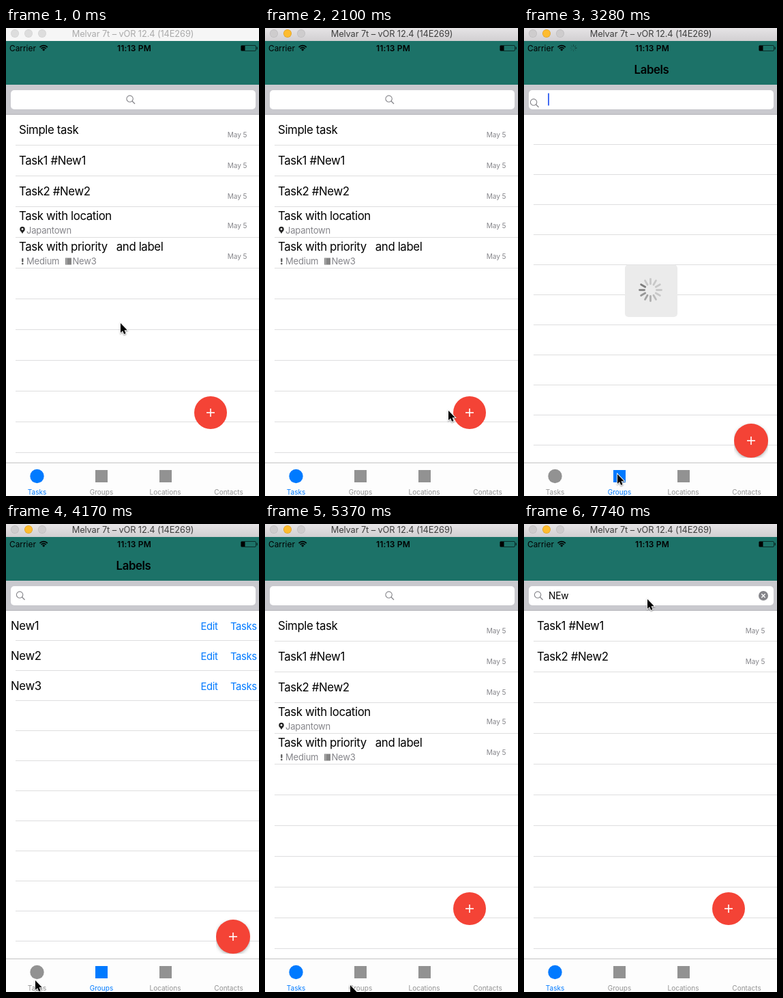
Write an HTML page with a canvas that moves like this. It is 371 px wide and 685 px high and loops after 8000 ms.

```html
<!DOCTYPE html>
<html lang="en">
<head>
<meta charset="utf-8">
<title>Task list</title>
<style>
  html, body { margin: 0; width: 100%; height: 100%; overflow: hidden; background: #fff; }
  canvas { display: block; }
</style>
</head>
<body>
<canvas id="stage" width="371" height="685"></canvas>
<script>
const ctx = document.getElementById('stage').getContext('2d');
const W = 371, H = 685, LOOP = 8000;
const BLUE = '#007aff', GRAY = '#929292', RED = '#f44336', TEAL = '#1c7268';

// Pointer stops: time, x, y
const POINTER = [
  [0, 168, 432], [1950, 243, 521], [2100, 269, 560], [2250, 191, 618],
  [2400, 161, 652], [2540, 159, 652], [2690, 137, 653], [3570, 110, 655],
  [3720, 51, 669], [4170, 43, 668], [5370, 125, 675], [5660, 164, 193],
  [5810, 165, 178], [5950, 181, 110]
];
// Caret stops: time, x, opacity
const CARET = [
  [0, 36, 0], [3280, 36, 1], [4020, 36, .5], [4170, 36, 0], [6550, 36, 1],
  [6850, 54, 1], [7000, 65, 1], [7590, 65, .5], [7740, 65, 0]
];
const TASKS = [
  { title: 'Simple task' },
  { title: 'Task1 #New1' },
  { title: 'Task2 #New2' },
  { title: 'Task with location', place: 'Japantown' },
  { title: 'Task with priority\u00a0\u00a0\u00a0and label', priority: 'Medium', label: 'New3' }
];
const LABELS = ['New1', 'New2', 'New3'];
const TABS = [['Tasks', 45.5], ['Groups', 140], ['Locations', 233.5], ['Contacts', 326.5]];

const latest = (stops, t) => stops.filter(s => s[0] <= t).pop();

function text(str, x, y, size, { color = '#000', align = 'left', spacing = 0, weight = 400 } = {}) {
  ctx.font = `${weight} ${size}px Inter, sans-serif`;
  ctx.letterSpacing = spacing + 'px';
  ctx.textAlign = align;
  ctx.fillStyle = color;
  ctx.fillText(str, x, y);
}

function rect(x, y, w, h, color, radius = 0) {
  ctx.fillStyle = color;
  ctx.beginPath();
  ctx.roundRect(x, y, w, h, radius);
  ctx.fill();
}

function disc(x, y, r, color) {
  ctx.fillStyle = color;
  ctx.beginPath();
  ctx.arc(x, y, r, 0, Math.PI * 2);
  ctx.fill();
}

function line(x1, y1, x2, y2, color, width, cap = 'butt') {
  ctx.strokeStyle = color;
  ctx.lineWidth = width;
  ctx.lineCap = cap;
  ctx.beginPath();
  ctx.moveTo(x1, y1);
  ctx.lineTo(x2, y2);
  ctx.stroke();
}

function shape(points, color) {
  ctx.fillStyle = color;
  ctx.beginPath();
  points.forEach(([x, y]) => ctx.lineTo(x, y));
  ctx.closePath();
  ctx.fill();
}

function titleBar(active) {
  const fill = ctx.createLinearGradient(0, 0, 0, 19);
  fill.addColorStop(0, active ? '#e6e4e6' : '#f6f6f6');
  fill.addColorStop(1, active ? '#d1cfd1' : '#f6f6f6');
  rect(0, 0, W, 19, fill);
  [13, 33, 53].forEach((x, i) => {
    const lit = active && i === 1;
    disc(x, 8, 6, lit ? '#dfa023' : active ? '#bdbbbd' : '#d2d2d2');
    disc(x, 8, 5.3, lit ? '#fdbc2f' : active ? '#cecccd' : '#dddddd');
  });
  text('Melvar 7t – vOR 12.4 (14E269)', 186, 13, 12.8,
    { color: active ? '#3e3e3e' : '#aaa', align: 'center', spacing: -.1 });
}

function spinner(x, y, spokes, inner, outer, width, head, color) {
  for (let i = 0; i < spokes; i++) {
    const a = i / spokes * Math.PI * 2 - Math.PI / 2;
    const age = ((head - i) % spokes + spokes) % spokes;
    line(x + inner * Math.cos(a), y + inner * Math.sin(a),
      x + outer * Math.cos(a), y + outer * Math.sin(a),
      color(Math.max(0, 1 - age / (spokes * .5))), width, 'round');
  }
}

function wifi(x, y) {
  const from = -Math.PI * .75, to = -Math.PI * .25;
  ctx.strokeStyle = '#000';
  ctx.lineCap = 'butt';
  ctx.lineWidth = 1.7;
  for (const r of [5, 8]) {
    ctx.beginPath();
    ctx.arc(x, y, r, from, to);
    ctx.stroke();
  }
  ctx.fillStyle = '#000';
  ctx.beginPath();
  ctx.moveTo(x, y);
  ctx.arc(x, y, 2.9, from, to);
  ctx.fill();
}

function header(title, loading, step) {
  rect(0, 19, W, 64, TEAL);
  text('Carrier', 5, 33.5, 11.9);
  wifi(55.2, 33.7);
  if (loading) {
    spinner(72.5, 29.3, 8, 2.6, 4.6, 1, step, k => `rgba(0,0,0,${.2 + .4 * k})`);
  }
  text('11:13 PM', 188, 33.5, 12, { weight: 600, align: 'center', spacing: .2 });
  ctx.strokeStyle = '#0b2e2a';
  ctx.lineWidth = 1;
  ctx.beginPath();
  ctx.roundRect(344.5, 25.5, 22, 8, 1.5);
  ctx.stroke();
  rect(345, 26, 5.5, 7, '#000');
  rect(367.5, 27.5, 1.5, 4, '#0b2e2a', 1);
  if (title) text(title, 187, 67, 16.8, { weight: 600, align: 'center', spacing: -.37 });
}

function searchBar(iconX, iconY, query) {
  rect(0, 83, W, 44, '#c9c9ce');
  line(0, 126.5, W, 126.5, '#b5b5ba', 1);
  rect(7, 91, 359, 28, '#fff', 5);
  ctx.strokeStyle = '#85858a';
  ctx.lineWidth = 1.1;
  ctx.beginPath();
  ctx.arc(iconX - 1.4, iconY - 1.4, 4.7, 0, Math.PI * 2);
  ctx.stroke();
  line(iconX + 2, iconY + 2, iconX + 6, iconY + 6, '#85858a', 1.3);
  if (!query) return;
  text(query, 36, 109.5, 13.8, { spacing: -.2 });
  disc(351, 105, 7, '#85858a');
  line(348.3, 102.3, 353.7, 107.7, '#fff', 1.3);
  line(348.3, 107.7, 353.7, 102.3, '#fff', 1.3);
}

function separators(pitch) {
  for (let y = 126.5 + pitch; y < 636; y += pitch) line(14, y, W, y, '#dededf', 1);
}

function addButton(x, y, r, shadow) {
  ctx.save();
  if (shadow) {
    ctx.beginPath();
    ctx.rect(308, 579, 50, 50);
    ctx.clip();
    ctx.shadowColor = 'rgba(0,0,0,.3)';
    ctx.shadowBlur = 5;
    ctx.shadowOffsetY = 2;
  }
  disc(x, y, r, RED);
  ctx.restore();
  line(x - 6, y, x + 6, y, '#fff', 1.6);
  line(x, y - 6, x, y + 6, '#fff', 1.6);
}

function pin(x, y) {
  disc(x, y - 1.5, 3.7, '#222');
  shape([[x - 3.5, y - .5], [x + 3.5, y - .5], [x, y + 5]], '#222');
  disc(x, y - 1.6, 1.4, '#fff');
}

function taskList(tasks) {
  const note = { color: '#85858a', spacing: -.2 };
  separators(45);
  tasks.forEach((task, i) => {
    const y = 127 + i * 45;
    const detailed = task.place || task.priority;
    text(task.title, 19, y + (detailed ? 19 : 28), 16.8, { spacing: -.37 });
    text('May 5', 353.5, y + (detailed ? 30.5 : 32.5), 10, { color: '#85858a', align: 'right' });
    if (task.place) {
      pin(24, y + 34);
      text(task.place, 30, y + 39, 13, note);
    }
    if (task.priority) {
      rect(23.2, y + 30, 2.2, 5.8, '#555', 1);
      disc(24.3, y + 38, 1.3, '#555');
      text(task.priority, 30, y + 39, 13, note);
      rect(87, y + 29.5, 9, 10, '#858585');
      rect(88.6, y + 29.5, .8, 10, '#d0d0d0');
      text(task.label, 97.5, y + 39, 13, note);
    }
  });
  addButton(300, 563, 24);
}

function labelList(labels) {
  const link = { color: BLUE, spacing: -.35 };
  separators(44);
  labels.forEach((name, i) => {
    const y = 155 + i * 44;
    text(name, 7, y, 16.8, { spacing: -.37 });
    text('Edit', 285.5, y - .5, 14.8, link);
    text('Tasks', 329, y - .5, 14.8, link);
  });
  addButton(333, 604, 25, true);
}

function tabBar(selected) {
  rect(0, 636, W, 49, '#fdfdfd');
  line(0, 636.5, W, 636.5, '#c4c4c4', 1);
  TABS.forEach(([name, x], i) => {
    const color = i === selected ? BLUE : GRAY;
    if (i === 0) disc(x, 656, 10.2, color);
    else if (i < 3) rect(Math.round(x) - 9, 647, 18, 18, color);
    text(name, x, 682.5, 10, { color, align: 'center' });
  });
}

function progress(alpha, step) {
  ctx.globalAlpha = alpha;
  rect(148, 346.5, 77, 76.5, '#ebebeb', 5);
  spinner(185.5, 383.5, 12, 9, 16, 2.8, step, k => {
    const v = Math.round(200 - 75 * k);
    return `rgb(${v},${v},${v})`;
  });
  ctx.globalAlpha = 1;
}

function pointer(x, y) {
  const arrow = [[0, 0], [0, 14], [3.1, 11.2], [5.2, 16], [7.6, 15], [5.5, 10.3], [9.8, 10.2]];
  ctx.save();
  ctx.translate(x, y);
  ctx.lineJoin = 'miter';
  ctx.shadowColor = 'rgba(0,0,0,.35)';
  ctx.shadowBlur = 2;
  ctx.shadowOffsetY = 1;
  ctx.strokeStyle = '#fff';
  ctx.lineWidth = 1.8;
  shape(arrow, '#000');
  ctx.stroke();
  ctx.shadowColor = 'transparent';
  shape(arrow, '#000');
  ctx.restore();
}

function draw(t) {
  const onLabels = t >= 3280 && t < 4470;
  const loading = onLabels && t < 3720;
  const step = t < 3430 ? 10 : t < 3570 ? 12 : 13;
  const query = t < 6850 ? '' : t < 7000 ? 'NE' : 'NEw';

  rect(0, 0, W, H, '#fff');
  titleBar(t >= 1500);
  header(onLabels && 'Labels', loading, step);

  if (onLabels && t < 3430) searchBar(15.5, 110, '');
  else searchBar(onLabels || t >= 6550 ? 21.5 : 183, 105, query);

  if (onLabels) labelList(t < 3570 ? [] : LABELS);
  else taskList(query ? TASKS.slice(1, 3) : TASKS);

  tabBar(onLabels ? 1 : 0);
  if (loading) progress(t < 3570 ? 1 : .15, step);

  const [, caretX, caretAlpha] = latest(CARET, t);
  ctx.globalAlpha = caretAlpha;
  rect(caretX - 1, 95.5, 2, 18, '#426bf2');
  ctx.globalAlpha = 1;

  const [, x, y] = latest(POINTER, t);
  pointer(x, y);
}

const start = performance.now();
function tick() {
  draw((performance.now() - start) % LOOP);
  requestAnimationFrame(tick);
}
tick();
</script>
</body>
</html>
```
